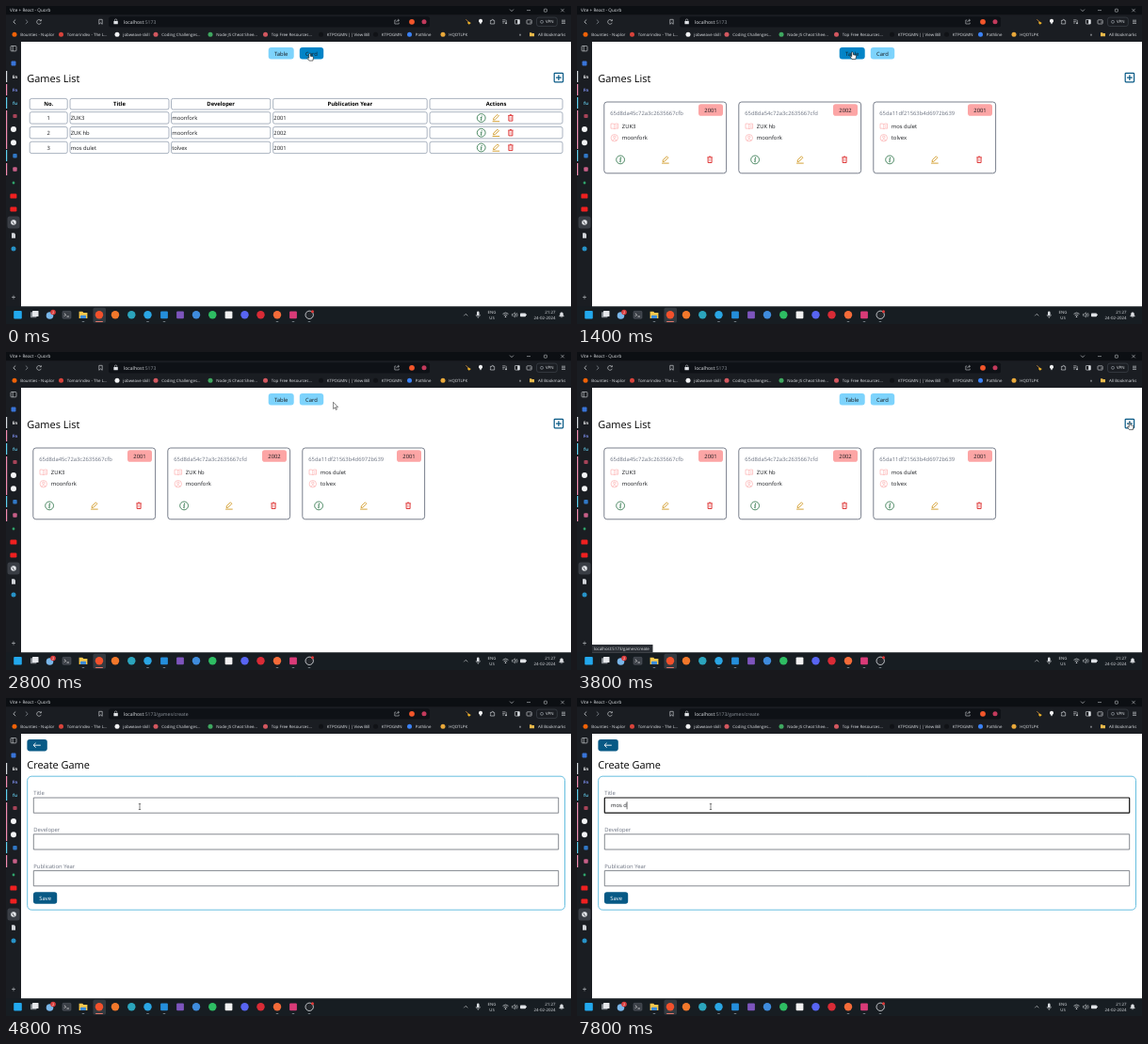
These frames come from a looping animation (600x338 px, 8000 ms). An HTML page with a canvas:

```html
<!DOCTYPE html>
<html lang="en">
<head>
<meta charset="utf-8">
<title>Games List</title>
<style>
html, body { margin: 0; width: 100%; height: 100%; overflow: hidden; background: #fff; }
canvas { display: block; width: 100vw; height: 100vh; }
</style>
</head>
<body>
<canvas id="stage"></canvas>
<script>
const canvas = document.getElementById('stage');
const ctx = canvas.getContext('2d');
const W = 600, H = 338, LOOP = 8000, STEP = 200;
const ratio = window.devicePixelRatio || 1;
canvas.width = W * ratio;
canvas.height = H * ratio;

const SANS = '"Open Sans", "Noto Sans", sans-serif';
const BODY = 5.85;
const INK = '#16181c', GRAY = '#6b7280', LIGHT = '#dfe2e6', DIM = '#8f959d';
const SKY = '#7dd3fc', SKY_HOVER = '#0284c7', SKY_DARK = '#075985', ROSE = '#fca5a5';
const GREEN = '#166534', AMBER = '#ca8a04', RED = '#dc2626';

const games = [
  { title: 'ZUK3', developer: 'moonfork', year: '2001', id: '65d8da45c72a3c2635667cfb' },
  { title: 'ZUK hb', developer: 'moonfork', year: '2002', id: '65d8da54c72a3c2635667cfd' },
  { title: 'mos dulet', developer: 'tolvex', year: '2001', id: '65da11df21563b4d6972b639' },
];
const typed = 'mos d';
const keyTimes = [6600, 6800, 7400, 7600, 7800];

const buttons = {
  table: { x: 278.7, y: 44, w: 27, h: 12.4 },
  card: { x: 311.8, y: 44, w: 25.4, h: 12.4 },
  add: { x: 581.6, y: 70.8, w: 10.6, h: 10.6 },
};
const fields = [
  { label: 'Title', y: 106 },
  { label: 'Developer', y: 144.8 },
  { label: 'Publication Year', y: 183.6 },
].map(f => ({ ...f, x: 29.3, w: 557.4, h: 16.2 }));

// time, x, y of the pointer tip
const pointerKeys = [
  [0, 322.5, 50.5], [800, 322.5, 50.5], [1400, 292.5, 49], [1600, 292.5, 49],
  [2000, 322, 50], [2200, 320, 51], [2600, 320, 51], [3600, 585, 73],
  [3800, 587, 75], [4000, 587, 75], [4800, 142, 115.5], [8000, 142, 115.5],
];

// ---------- drawing helpers ----------
function box(x, y, w, h, fill, r = 0, stroke, lw = 0.8) {
  ctx.beginPath();
  ctx.roundRect(x, y, w, h, r);
  if (fill) { ctx.fillStyle = fill; ctx.fill(); }
  if (stroke) { ctx.strokeStyle = stroke; ctx.lineWidth = lw; ctx.stroke(); }
}

function dot(x, y, r, fill, stroke, lw = 0.8) {
  box(x - r, y - r, 2 * r, 2 * r, fill, r, stroke, lw);
}

function square(x, y, size, fill) {
  box(x - size / 2, y - size / 2, size, size, fill, 1);
}

function path(d, x, y, stroke, lw = 0.8, fill) {
  const shape = new Path2D(d);
  ctx.save();
  ctx.translate(x, y);
  if (fill) { ctx.fillStyle = fill; ctx.fill(shape); }
  if (stroke) { ctx.strokeStyle = stroke; ctx.lineWidth = lw; ctx.stroke(shape); }
  ctx.restore();
}

// y is the middle of the capitals
function text(s, x, y, size = BODY, color = INK, align = 'left', weight = 400) {
  ctx.font = `${weight} ${size}px ${SANS}`;
  ctx.textAlign = align;
  ctx.fillStyle = color;
  ctx.fillText(s, x, y + size * 0.36);
  return ctx.measureText(s).width;
}

const inside = (p, r) => p.x >= r.x && p.x <= r.x + r.w && p.y >= r.y && p.y <= r.y + r.h;

// ---------- icons ----------
function infoIcon(x, y) {
  dot(x, y, 4.4, null, GREEN, 0.75);
  dot(x + 0.5, y - 2, 0.6, GREEN);
  path('M-.9 -.5H.4L-.4 2.3Q-.4 2.8 .6 2.3', x, y, GREEN, 0.8);
}

function editIcon(x, y) {
  path('M-2.9 2.1L-2.5 .2L1.5 -3.6L3 -2.1L-1 1.8Z', x, y, AMBER, 0.75);
  path('M-3.8 3.7H3.8', x, y, AMBER, 0.8);
}

function deleteIcon(x, y) {
  path('M-2.7 -2.6H2.7M-1 -3.3H1M-2 -2.4V3.1H2V-2.4', x, y, RED, 0.9);
  path('M-.7 -1.2V2M.7 -1.2V2', x, y, RED, 0.35);
}

function actionIcons(x, y, gapEdit, gapDelete) {
  infoIcon(x, y);
  editIcon(x + gapEdit, y);
  deleteIcon(x + gapDelete, y);
}

function bookIcon(x, y) {
  path('M0 -2.2Q-1.8 -3.2 -3.8 -2.6V2.4Q-1.8 2 0 2.8Q1.8 2 3.8 2.4V-2.6Q1.8 -3.2 0 -2.2V2.8', x, y, ROSE, 0.6);
  path('M1.2 -1.1H2.8M1.2 .1H2.8M1.2 1.2H2.8', x, y, ROSE, 0.4);
}

function personIcon(x, y) {
  dot(x, y, 3.7, null, ROSE, 0.6);
  dot(x, y - 1, 1.2, null, ROSE, 0.6);
  path('M-2.3 2.7Q0 -.2 2.3 2.7', x, y, ROSE, 0.6);
}

// ---------- browser window ----------
function drawToolbar(create) {
  box(0, 0, W, 38, '#1a1d22');
  box(0, 0, W, 9.3, '#0c0f13');
  text('Vite + React - Quorb', 4, 4.6, 4.7, LIGHT);
  path('M-2 -1L0 1L2 -1', 537, 4.6, LIGHT, 0.6);
  path('M-2 0H2', 555, 4.6, LIGHT, 0.5);
  box(571.4, 3.2, 3, 3, null, 0.5, LIGHT, 0.5);
  path('M-1.7 -1.7L1.7 1.7M1.7 -1.7L-1.7 1.7', 591, 4.6, LIGHT, 0.5);

  path('M1.2 -2.3L-1.2 0L1.2 2.3', 9, 16.8, LIGHT, 0.7);
  path('M-1.2 -2.3L1.2 0L-1.2 2.3', 22, 16.8, DIM, 0.7);
  path('M2.1 -1.2A2.4 2.4 0 1 0 2.3 1M2.3 -2.6V-1H.7', 35, 16.8, LIGHT, 0.6);
  path('M-1.7 -2.5H1.7V2.5L0 1.1L-1.7 2.5Z', 100.5, 16.8, LIGHT, 0.6);

  box(109, 11.2, 341, 11.2, '#0e1116', 2.5);
  box(114.4, 16.1, 4.4, 3.1, LIGHT, 0.5);
  path('M-1.2 0V-1.2A1.2 1.2 0 0 1 1.2 -1.2V0', 116.6, 16.3, LIGHT, 0.5);
  const host = text('localhost', 125, 16.8, 5.1, LIGHT);
  text(':5173' + (create ? '/games/create' : ''), 125 + host, 16.8, 5.1, DIM);
  path('M-.7 -1.8H-2.2V2.2H2.2V.8M-.7 .4Q0 -1.6 2.4 -1.6M1 -2.9L2.5 -1.6L1 -.3', 415, 16.8, LIGHT, 0.5);
  dot(431, 16.8, 2.9, '#f2562b');
  dot(444, 16.8, 2.5, '#c23a5c');

  path('M-2.6 -2.6L.5 .5', 491, 16.8, '#c98a3c', 0.9);
  path('M0 -.4L2.8 1.3L.8 3L-1 1.2Z', 491, 16.8, null, 0, '#f0b429');
  path('M0 2.7L-1.9 -.4A2 2 0 1 1 1.9 -.4Z', 504, 16.8, null, 0, '#f3f4f6');
  path('M-2.1 -1.4H-.5A.8 .8 0 1 1 1 -1.4H2.2V2.2H-2.1V1A.8 .8 0 0 0 -2.1 -.4Z', 516.5, 16.8, LIGHT, 0.6);
  path('M-2.3 -2H1M-2.3 -.4H.3M-2.3 1.2H-.3M1.7 -1.9V1.5', 529.5, 16.8, LIGHT, 0.55);
  dot(531, 18.4, 0.8, LIGHT);
  box(540.4, 14.5, 5, 4.6, null, 0.6, LIGHT, 0.6);
  box(543.2, 14.5, 2.2, 4.6, LIGHT);
  box(553, 14.8, 5.2, 4.2, null, 0.7, LIGHT, 0.6);
  dot(557, 17, 0.6, LIGHT);
  box(563.5, 12.1, 21.8, 9.4, null, 2.4, '#4b5059', 0.5);
  dot(569, 16.8, 1.5, null, DIM, 0.7);
  text('VPN', 573, 16.8, 4.4, LIGHT);
  path('M-2 -1.6H2M-2 0H2M-2 1.6H2', 592, 16.8, LIGHT, 0.6);

  const bookmarks = [
    [9, '#f26207', 'Bounties - Nuplor'], [58.5, '#d8433b', 'Tomorindex - The L...'],
    [118, '#f3f4f6', 'jobweave skill'], [159, '#d2575f', 'Coding Challenges...'],
    [217, '#3fa860', 'Node JS Cheat Shee...'], [275.5, '#d2575f', 'Top Free Resources...'],
    [334.5, '#101216', 'KTPOGMN || View Bill'], [392.5, '#101216', 'KTPOGMN'],
    [428.5, '#3b82f6', 'Pathline'], [464, '#e9a83a', 'HQDTLPK'],
  ];
  for (const [x, color, label] of bookmarks) {
    dot(x, 30.3, 2.5, color);
    text(label, x + 6.3, 30.3, 4.4, LIGHT);
  }
  text('»', 546, 30, 5, LIGHT, 'center');
  path('M-2.5 -2H-.5L.2 -1.2H2.5V2H-2.5Z', 558.5, 30.3, null, 0, '#e8b84a');
  text('All Bookmarks', 565, 30.3, 4.4, LIGHT);
}

function drawSidebar() {
  box(0, 37, 16, 283, '#1a1d22');
  box(5, 42.5, 6, 5.4, null, 0.8, LIGHT, 0.6);
  path('M7.2 42.5V48', 0, 0, LIGHT, 0.6);
  const strips = [
    [69, 12, '#d7dbe0'], [83, 12, '#f28cb1'], [97, 12, '#5fd0ee'],
    [111, 41, '#f28cb1'], [153, 12, '#5fd0ee'], [167, 13, '#f28cb1'],
  ];
  for (const [y, h, color] of strips) box(0, y, 1.2, h, color);
  square(8, 61, 5, '#3974d8');
  text('En', 9.5, 75, 4.6, '#f3f4f6', 'center', 700);
  text('Fn', 9.5, 89, 4.6, '#8193f5', 'center', 700);
  text('fu', 9.5, 103, 4.6, '#62c8e8', 'center', 700);
  square(9.5, 117, 4.2, '#a64358');
  dot(8, 131, 3, '#f3f4f6');
  dot(8, 145.2, 3, '#f3f4f6');
  square(9.5, 159.3, 4.4, '#3178c6');
  square(9.5, 173.5, 4.4, '#c85f88');
  dot(8, 188, 1.4, '#2fa36b');
  box(4.4, 199.6, 7, 5, '#ef2020', 1.2);
  box(4.4, 213.5, 7, 5, '#ef2020', 1.2);
  box(1.5, 223.5, 13, 13, '#3a3e45', 2.5);
  dot(8, 230, 2.8, '#e5e7eb');
  path('M-1.6 -1.2Q.4 -.4 -.4 .8L1.2 1.6', 8, 230, '#3a3e45', 0.8);
  path('M-2 -2.8H.8L2 -1.5V2.8H-2Z', 8, 244, null, 0, '#d2d5da');
  dot(8, 258, 2.5, '#2793c8');
  path('M-2 0H2M0 -2V2', 8, 309.5, LIGHT, 0.5);
}

function drawTaskbar() {
  box(0, 319.3, W, 18.7, '#171d22');
  box(92.5, 320.8, 13.5, 15.6, '#343a40', 1.5);
  square(12.5, 328.3, 8.6, '#22a9ee');
  box(26, 325.2, 6.5, 6, '#858b91', 0.6);
  box(28, 324, 6.5, 6, '#e5e7eb', 0.6);
  dot(46.5, 329, 3.8, '#79b7ea');
  dot(50, 325.5, 2.8, '#d83b3b');
  text('2', 50, 325.5, 3.8, '#fff', 'center');
  box(60, 324.4, 9, 7.8, '#3a3f46', 1, '#6c737b', 0.4);
  path('M-2.6 -1.6L-1 0L-2.6 1.6M0 1.8H2.4', 64.5, 328.2, '#fff', 0.7);
  path('M-4.4 -3.6H-.8L.3 -2.4H4.4V3.7H-4.4Z', 82, 328.3, null, 0, '#f7c84b');
  box(79, 328.8, 6, 3.2, '#3c8ddb', 0.5);

  const apps = [
    [99, '#f2512c'], [116, '#f2782b'], [133.3, '#2ba5bd'], [150.5, '#2aa6e4'],
    [168, '#248edb', 1], [185, '#7d55bd', 1], [202, '#3f8cdd'], [219.3, '#2ebd63'],
    [236.5, '#f1f1f1', 1], [253.5, '#5865f2'], [270.5, '#d92b36'], [288, '#f46b39'],
    [305, '#d93b78', 1],
  ];
  for (const [x, color, isSquare] of apps) {
    if (isSquare) square(x, 328.3, 7.8, color);
    else dot(x, 328.3, 4.2, color);
  }
  dot(322.2, 328.3, 4.2, '#22262b', '#e5e7eb', 0.8);
  dot(325.5, 324.8, 1.5, '#e03838');
  for (const x of [82, 150.5, 168, 288, 305, 322]) box(x - 1.4, 335, 2.8, 0.8, '#8b949c', 0.4);
  box(95, 335, 8, 0.9, '#e2776a', 0.4);

  path('M-2 1L0 -1L2 1', 488.3, 328.3, LIGHT, 0.6);
  box(500, 324.6, 2.6, 4.7, LIGHT, 1.3);
  path('M-2.2 -.4Q-2.2 2 0 2T2.2 -.4M0 2V3.6', 501.3, 328.3, LIGHT, 0.5);
  text('ENG', 516, 325.4, 4.3, LIGHT, 'center');
  text('US', 516, 331.6, 4.3, LIGHT, 'center');
  path('M-3 -1Q0 -3.6 3 -1M-1.8 .5Q0 -1 1.8 .5', 530.5, 328.3, LIGHT, 0.7);
  dot(530.5, 330.2, 0.8, LIGHT);
  path('M-2.6 -.9H-1.3L.4 -2.5V2.5L-1.3 .9H-2.6ZM1.4 -1.3Q2.3 0 1.4 1.3M2.4 -2.2Q4 0 2.4 2.2', 540, 328.3, LIGHT, 0.5);
  box(546, 326.4, 6, 3.8, LIGHT, 0.8);
  box(552.2, 327.5, 0.8, 1.6, LIGHT);
  text('21:27', 583.5, 325.4, 4.4, LIGHT, 'right');
  text('24-02-2024', 583.5, 331.6, 4.4, LIGHT, 'right');
  path('M-2.3 1.8Q-1.5 1 -1.5 -.6A1.5 1.7 0 0 1 1.5 -.6Q1.5 1 2.3 1.8ZM-.7 2.7H.7', 590, 328, LIGHT, 0.6, LIGHT);
}

// ---------- page views ----------
function drawButton(r, label, hovered) {
  box(r.x, r.y, r.w, r.h, hovered ? SKY_HOVER : SKY, 3);
  text(label, r.x + r.w / 2, r.y + r.h / 2 + 0.2, BODY, INK, 'center');
}

function drawListHeader(pointer) {
  drawButton(buttons.table, 'Table', inside(pointer, buttons.table));
  drawButton(buttons.card, 'Card', inside(pointer, buttons.card));
  text('Games List', 22.3, 76.8, 10.95, '#000');
  const a = buttons.add;
  box(a.x + 0.6, a.y + 0.6, a.w - 1.2, a.h - 1.2, null, 0.7, SKY_DARK, 1.2);
  path('M-2.9 0H2.9M0 -2.9V2.9', a.x + a.w / 2, a.y + a.h / 2, SKY_DARK, 1.2);
}

function drawTable() {
  const columns = [
    ['No.', 25.2, 40], ['Title', 68, 105], ['Developer', 175.5, 105.3],
    ['Publication Year', 283.6, 163.6], ['Actions', 450, 141],
  ];
  const border = '#64748b';
  for (const [label, x, w] of columns) {
    box(x, 98.4, w, 11.6, null, 2, border, 0.55);
    text(label, x + w / 2, 104.3, BODY, '#000', 'center', 700);
  }
  games.forEach((game, i) => {
    const top = 112.7 + i * 15.75, mid = top + 6.4;
    for (const [, x, w] of columns) box(x, top, w, 12.4, null, 2, border, 0.55);
    text(i + 1, 45.2, mid, BODY, INK, 'center');
    text(game.title, 68.7, mid);
    text(game.developer, 176.2, mid);
    text(game.year, 284.3, mid);
    actionIcons(504.7, mid - 0.1, 15.7, 31.2);
  });
}

function drawCards() {
  games.forEach((game, i) => {
    const x = 28.8 + i * 143;
    box(x, 102, 129.8, 75.8, null, 3, GRAY, 0.9);
    box(x + 100.2, 104.2, 26, 12.6, ROSE, 2.8);
    text(game.year, x + 113.2, 110.7, BODY, INK, 'center');
    text(game.id, x + 6.4, 113.7, BODY, GRAY);
    bookIcon(x + 11, 127.8);
    text(game.title, x + 19, 127.8);
    personIcon(x + 11, 140.2);
    text(game.developer, x + 19, 140.2);
    actionIcons(x + 17.3, 163.4, 47.8, 95);
  });
}

function drawForm(t) {
  box(22.4, 44, 21.4, 12.4, SKY_DARK, 2.8);
  path('M3.8 0H-3.8M-1.4 -2.4L-3.9 0L-1.4 2.4', 33, 50.2, '#fff', 0.9);
  text('Create Game', 22.3, 70.6, 10.95, '#000');
  box(22.7, 83.2, 570.8, 142, null, 4.5, '#56b7dc', 0.9);

  const focused = t >= 5000;
  fields.forEach((f, i) => {
    const active = focused && i === 0;
    text(f.label, f.x, f.y - 5, BODY, GRAY);
    box(f.x, f.y, f.w, f.h, null, active ? 0.8 : 0, active ? '#101010' : '#666b74', active ? 1.2 : 0.8);
  });
  box(29, 206.2, 25.2, 12.6, SKY_DARK, 2.8);
  text('Save', 41.6, 212.6, BODY, '#fff', 'center');

  if (!focused) return;
  const count = keyTimes.filter(k => t >= k).length;
  const width = text(typed.slice(0, count), 36, 114.3);
  const caretHidden = t >= 5600 && t < 6000;
  if (!caretHidden) box(35.9 + width, 110.2, 0.6, 8, '#222');
}

function drawStatus() {
  box(16, 311, 64.5, 8.4, '#2a2e34');
  text('localhost:5173/games/create', 17.8, 315.2, 4.4, LIGHT);
}

// ---------- pointer ----------
function pointerAt(t) {
  const i = pointerKeys.findIndex((k, n) => n > 0 && t < k[0]);
  const [t0, x0, y0] = pointerKeys[i - 1], [t1, x1, y1] = pointerKeys[i];
  const p = (t - t0) / (t1 - t0), e = p * p * (3 - 2 * p);
  return { x: x0 + (x1 - x0) * e, y: y0 + (y1 - y0) * e };
}

function drawPointer(p, kind) {
  if (kind === 'text') {
    path('M-1.2 -3H1.2M0 -3V3M-1.2 3H1.2', p.x, p.y, '#333', 0.6);
  } else if (kind === 'hand') {
    path('M-.8 .5Q0 -.6 .8 .5V2.8L3.4 3.3Q4.1 3.6 4 4.4L3.4 7.6H-.5L-2.5 4.8Q-2.2 3.8 -1.4 4.4L-.8 4.9Z',
      p.x, p.y, '#111', 0.6, '#fff');
  } else {
    path('M0 0V7.2L1.7 5.7L2.8 8.2L3.9 7.7L2.8 5.3H5Z', p.x, p.y, '#111', 0.5, '#fff');
  }
}

function render(t) {
  const create = t >= 4000;
  const tableView = t < 200 || (t >= 1600 && t < 2400);
  const pointer = pointerAt(t);
  let kind = 'arrow';

  ctx.setTransform(ratio, 0, 0, ratio, 0, 0);
  ctx.textRendering = 'geometricPrecision';
  box(0, 0, W, H, '#fff');
  if (create) {
    drawForm(t);
    if (fields.some(f => inside(pointer, f))) kind = 'text';
  } else {
    drawListHeader(pointer);
    if (tableView) drawTable(); else drawCards();
    if (Object.values(buttons).some(r => inside(pointer, r))) kind = 'hand';
  }
  drawToolbar(create);
  drawSidebar();
  drawTaskbar();
  if (!create && inside(pointer, buttons.add)) drawStatus();
  drawPointer(pointer, kind);
}

function tick() {
  const t = performance.now() % LOOP;
  render(Math.floor(t / STEP) * STEP);
  requestAnimationFrame(tick);
}
tick();
</script>
</body>
</html>
```
